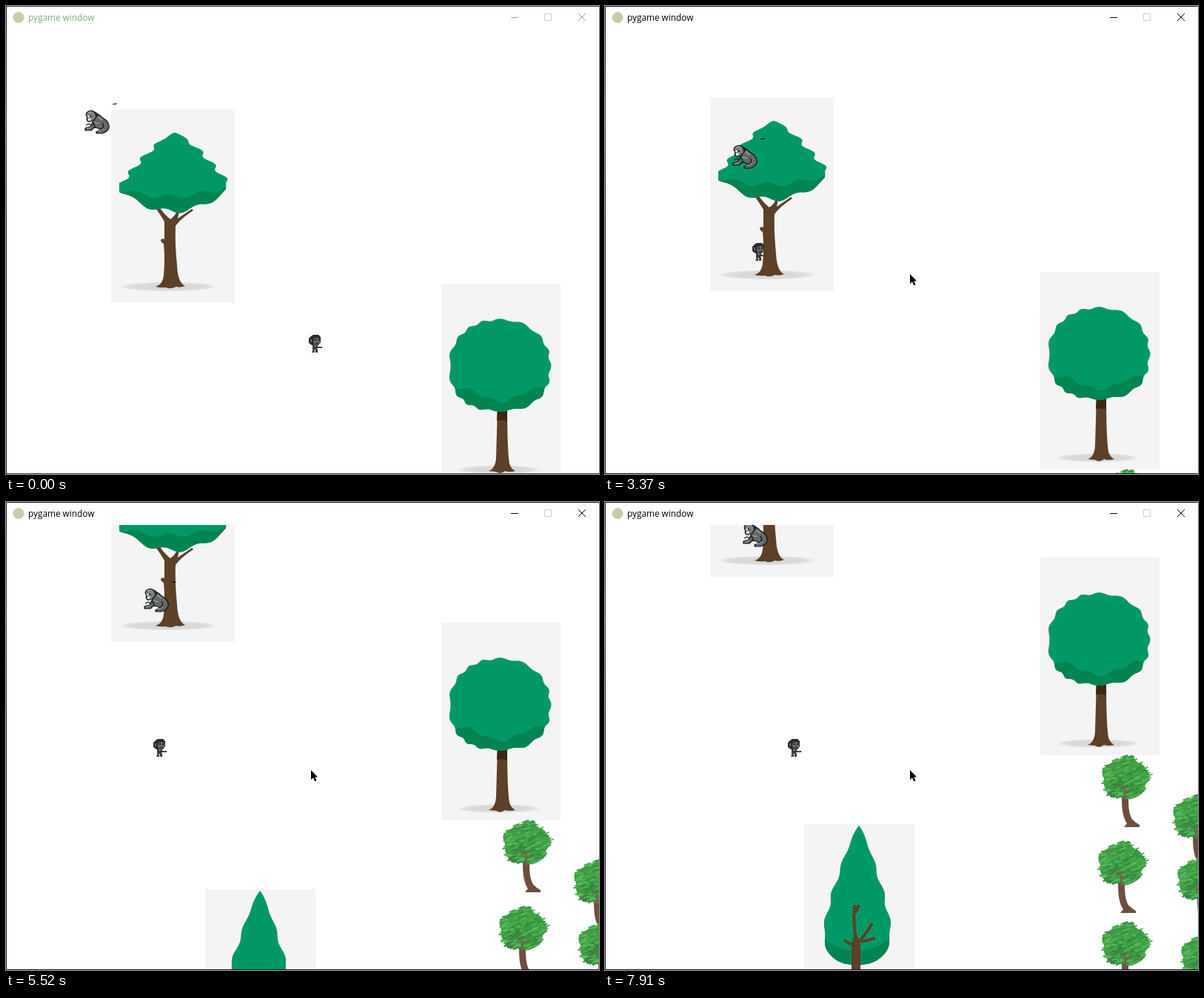
Recreate the animation shown at these times as an HTML page. Size 801x632 px, loop 7.99 s.

```html
<!DOCTYPE html>
<html lang="en">
<head>
<meta charset="utf-8">
<title>pygame window</title>
<style>
html, body { margin: 0; width: 100%; height: 100%; overflow: hidden; background: #fff; }
svg { display: block; }
</style>
</head>
<body>
<svg width="801" height="632" viewBox="0 0 801 632">
  <defs>
    <clipPath id="view"><path d="M1 31H801V631H1Z"/></clipPath>
    <radialGradient id="shade">
      <stop offset=".5" stop-color="#d8d8d8"/><stop offset=".8" stop-color="#dedede"/><stop offset="1" stop-color="#f4f4f4"/>
    </radialGradient>
    <linearGradient id="edge" x2="0" y2="1">
      <stop offset="0" stop-color="#223"/><stop offset=".25" stop-color="#5a4a30"/><stop offset=".45" stop-color="#2b2b33"/><stop offset="1" stop-color="#223"/>
    </linearGradient>
    <g id="bush"></g>
  </defs>
  <rect width="801" height="632" fill="#fff"/>

  <g clip-path="url(#view)">
    <g id="world">
      <g fill="#f4f4f4" shape-rendering="crispEdges">
        <rect x="142" y="140" width="167" height="261"/>
        <rect x="588" y="375" width="161" height="267"/>
        <rect x="269" y="735" width="149" height="270"/>
      </g>
      <ellipse cx="219" cy="379" rx="67" ry="6.5" fill="url(#shade)"/>
      <ellipse cx="666" cy="626" rx="57" ry="6" fill="url(#shade)"/>
      <g fill="#5c4028">
        <path d="M197 266L204 267Q212 280 222 288Q228 284 231 277H234L232 287L251 274L253 276Q236 287 229 297Q228 320 231 350Q232 374 242 378Q235 381 230 379Q222 383 216 380Q208 381 202 379Q212 376 213 364Q215 340 213 321Q209 319 209 316Q211 313 214 315V291Q207 279 197 266Z"/>
        <path d="M664 540H677Q677 600 680 618Q682 625 688 628Q680 630 674 628Q668 633 662 629L652 628Q661 625 662 610Z"/>
        <path fill="#3c2614" d="M664 540H677V561Q670 558 663 560Z"/>
      </g>
      <g id="crowns"></g>
      <path fill="#5c4028" d="M333 940V896L336 886H341L345 898V940Z"/>
      <path fill="none" stroke="#5c4028" stroke-width="4" d="M339 890Q335 870 337 844M337 856L343 844M341 896Q351 886 361 869M346 894L365 889M323 892L336 899"/>
      <g id="bushes"></g>
    </g>

    <g id="ape" stroke-linejoin="round" stroke="#111" stroke-width="1.2">
      <path fill="#646866" d="M13 6Q20 4 23 9L29 13Q34 18 33 24Q31 29 24 31L16 31L16 29L22 26Q18 23 13 23L9 27H1L1 24L8 22Q10 17 13 13Z"/>
      <path fill="#7c817e" d="M3 3Q7 -1 12 1Q17 5 15 10Q11 16 5 15Q2 12 4 9Q1 6 3 3Z"/>
      <path fill="none" stroke="#a9aeab" d="M5 3Q8 1 11 3M17 8L24 13M3 25L9 23M19 28L26 25M14 16Q17 18 20 17"/>
      <path fill="#e4e6e4" stroke="none" d="M4 7H7V9H4ZM5 11L9 10L8 14H5Z"/>
      <path fill="none" d="M14 2L18 5L17 9M7 7L10 9M10 16Q15 20 14 24M24 17Q28 22 22 26M2 20L6 18L9 20"/>
      <path fill="none" d="M38 -8.5H42M41 -9H44"/>
    </g>

    <g id="kid">
      <path fill="#2a2b2d" d="M3 2L6 0H13L16 3V10L13 14H4L0 11V5Z"/>
      <path fill="#66686a" d="M7 5L13 4L15 7V11L12 13H8L6 10ZM2 6H4V10H2Z"/>
      <path fill="#222" d="M8 6H10V8H8ZM12 6H14V8H12ZM9 11H13V12H9Z"/>
      <path fill="#37393b" d="M5 13H12V16H18V18H11L12 20V24H9V20H8V24H4L5 22Z"/>
      <path fill="#707375" d="M7 14H10V16H7ZM14 16H16V17H14ZM6 19H7V22H6Z"/>
    </g>
  </g>

  <path id="frame" d="M0 .5H801M0 631.5H801" stroke="#222"/>
  <path d="M0 0H1V632H0Z" fill="url(#edge)"/>
  <circle cx="17" cy="15.5" r="7.5" fill="#c9ccaa"/>
  <text id="caption" x="30" y="20" font-size="11.8" font-family="'Open Sans','Noto Sans',sans-serif">pygame window</text>
  <path id="buttons" fill="none" d="M682 15.5H692M773 10L783 20M783 10L773 20"/>
  <path d="M727.5 10.5H736.5V19.5H727.5Z" fill="none" stroke="#d0d0d0"/>
  <path id="cursor" d="M0 0V13L3 10.3L5.2 15.2L7.4 14.2L5.2 9.4H9Z"/>
</svg>
<script>
const LOOP = 7990;
const { PI, sin, cos, abs, sign, min, max, sqrt, exp, floor, round } = Math;
const $ = id => document.getElementById(id);

function add(parent, tag, attrs) {
  const el = document.createElementNS('http://www.w3.org/2000/svg', tag);
  for (const k in attrs) el.setAttribute(k, attrs[k]);
  parent.appendChild(el);
  return el;
}

// Points of f(u) for u from 0 to 1.
const sample = (f, n = 80) => Array.from({ length: n + 1 }, (_, i) => f(i / n));
const polygon = pts => 'M' + pts.map(p => p.map(v => v.toFixed(1))).join('L') + 'Z';
const wave = (x, peak, period) => cos(2 * PI * (x - peak) / period);

// Light crown, dark below the rim line y = rim(x).
function crown(id, outline, rim) {
  const d = polygon(outline), g = $('crowns');
  add(add($('crowns'), 'clipPath', { id }), 'path', { d });
  add(g, 'path', { d, fill: '#009966' });
  const xs = outline.map(p => p[0]), left = min(...xs), right = max(...xs);
  const line = sample(u => left + u * (right - left)).map(x => [x, rim(x)]);
  add(g, 'path', {
    d: polygon([...line, [right, 960], [left, 960]]),
    fill: '#008552', 'clip-path': `url(#${id})`
  });
}

// Broad tree: rippled flanks from the top, then a sagging underside.
const oakFlank = (side, peak) => v =>
  [228 + side * (72 * v ** .75 + 4 * min(1, 4 * v) * wave(v, peak, .27)), 171 + 68 * v];
const oakBase = u => {
  const x = 297 - 144 * u;
  return [x, 277 - 30 * ((x - 226) / 75) ** 2 + 3 * wave(x, 236, 43)];
};
crown('oak',
  [...sample(oakFlank(1, .36)), ...sample(oakBase), ...sample(oakFlank(-1, .49)).reverse()],
  x => 257 - 12 * ((x - 220) / 75) ** 2 + 3 * wave(x, 198, 43));

// Round tree: squarish ellipse with small lobes.
const roundEdge = u => {
  const a = 2 * PI * u, p = sin(a) > 0 ? .82 : .95;
  const r = 1 + .022 * cos(17 * a + 1.5 * sin(3 * a));
  const bend = v => sign(v) * abs(v) ** p;
  return [667 + 68 * r * bend(cos(a)), 485 + 61.5 * r * bend(sin(a))];
};
crown('round', sample(roundEdge, 200),
  x => 514 + 20 * exp(-(((x - 668) / 34) ** 2)) + 2 * wave(x, 671, 30));

// Pointed tree: teardrop with a slight ripple.
const coneFlank = side => u =>
  [343 - 3 * u + side * (62 * u ** .8 * sqrt(1 - u ** 6) + 2 * sin(PI * u) * sin(30 * u)), 737 + 189 * u];
crown('cone',
  [...sample(coneFlank(1)), ...sample(coneFlank(-1)).reverse()],
  x => 906 - 14 * ((x - 340) / 42) ** 2);

let seed = 11;
const rnd = () => (seed = seed * 16807 % 2147483647) / 2147483647;

// Brushed little tree, origin at the middle of its crown.
function paintBush() {
  const g = $('bush'), greens = ['#3b9a40', '#4cae50', '#5bbb5d', '#2f8a3c', '#43a548'];
  add(g, 'path', { d: 'M0 20Q-2 48 6 59L10 62', stroke: '#6f4e40', 'stroke-width': 9, fill: 'none' });
  add(g, 'path', { d: 'M-2 66L3 60L11 58L19 63V66Z', fill: '#6f4e40' });
  const edge = a => 1 + .05 * cos(5 * a + 1) + .03 * cos(9 * a);
  add(g, 'path', {
    d: polygon(sample(u => {
      const a = 2 * PI * u;
      return [31 * edge(a) * cos(a), 28 * edge(a) * sin(a)];
    })),
    fill: '#3f9f45'
  });
  for (let i = 0; i < 260; i++) {
    const a = rnd() * 2 * PI, r = sqrt(rnd()) * edge(a);
    const x = cos(a) * r * 31, y = sin(a) * r * 29;
    add(g, 'path', {
      d: `M${(x - 4).toFixed(1)} ${(y + 1).toFixed(1)}l${(5 + rnd() * 4).toFixed(1)} ${(-1 - rnd() * 3).toFixed(1)}`,
      stroke: y > 8 && rnd() < .4 ? '#3b8543' : greens[i % 5], 'stroke-width': 1.8
    });
  }
  add(g, 'path', { d: 'M0 30L-2 16L-8 10M-2 18L3 10M-1 22L9 14', stroke: '#75604a', 'stroke-width': 1.6, fill: 'none' });
}
paintBush();
for (const [x, y] of [[703, 673], [698, 789], [703, 898], [799, 726], [805, 810], [810, 914]])
  add($('bushes'), 'use', { href: '#bush', x, y });

// Steps before and after the pause, when keys are held again.
function stepAt(t) {
  if (t < 750) return -1;
  if (t < 6150) return min(62, floor((t - 750) / 76.9));
  return min(86, 63 + floor((t - 6150) / 76.5));
}

const move = (id, x, y) => $(id).setAttribute('transform', `translate(${round(x)} ${round(y)})`);

function draw(t) {
  const n = stepAt(t);
  // Distance covered by step n of a steady move from step a to step b.
  const go = (a, b, dist) => dist * max(0, min(1, (n - a) / (b - a)));

  const scroll = 4 * round((go(32, 45, 96) + go(45, 62, 116) + go(62, 72, 88)) / 4);
  move('world', 0, -scroll);
  move('ape', 106 + go(20, 37, 80), 141 + go(20, 62, 188) - scroll);
  move('kid',
    409 + go(-1, 11, -102) + go(12, 30, -108) + go(73, 77, -26) + go(77, 86, 74),
    444 + go(-1, 11, -74) + go(11, 19, -50));

  const glide = t < 220 ? 1 : t < 290 ? .5 : 0;
  $('cursor').style.display = t < 140 ? 'none' : '';
  move('cursor', 444 + 225 * glide + go(-1, 3, -32), 349 + 226 * glide + go(-1, 3, 13));

  const focus = t < 440 ? 0 : t < 520 ? 1 : 2;
  $('caption').setAttribute('fill', ['#80a884', '#405442', '#000'][focus]);
  $('buttons').setAttribute('stroke', ['#999', '#4c4c4c', '#000'][focus]);
  $('frame').setAttribute('stroke', ['#3c4648', '#2c3032', '#1c1c20'][focus]);
}

const start = performance.now();
function tick() {
  draw((performance.now() - start) % LOOP);
  requestAnimationFrame(tick);
}
tick();
</script>
</body>
</html>
```
